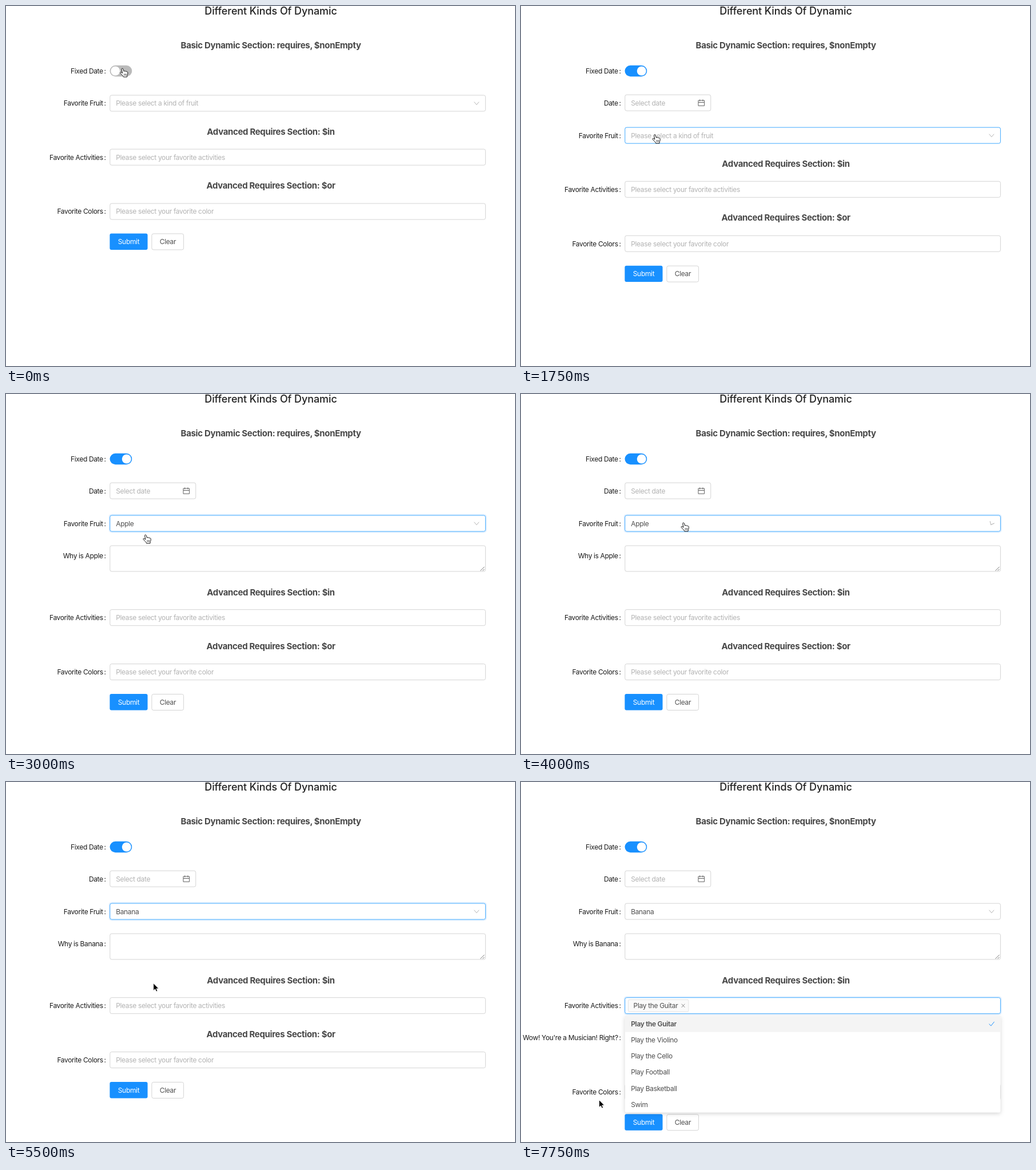
These frames come from a looping animation (890 by 629 pixels, 8 s). An HTML page:

```html
<!DOCTYPE html>
<html lang="en">
<head>
<meta charset="utf-8">
<title>Different Kinds Of Dynamic</title>
<style>
  html, body { margin: 0; width: 100%; height: 100%; overflow: hidden; background: #fff; }
  svg { display: block; width: 100%; height: 100%; }
  text { font: 12px Inter, "Open Sans", sans-serif; letter-spacing: -.34px; fill: #4f4f4f; }
  .title { font-size: 18px; font-weight: 500; letter-spacing: -.09px; fill: #222; text-anchor: middle; }
  .heading { font-size: 15px; font-weight: 700; letter-spacing: -.34px; fill: #484848; text-anchor: middle; }
  .label { fill: #1c1c1c; letter-spacing: -.36px; }
  .end, .mid { text-anchor: end; }
  .mid { text-anchor: middle; }
  .hint { fill: #b3b3b3; }
  .bold { font-weight: 600; }
  .white { fill: #fff; }
  .line { fill: none; stroke-width: 1; }
  .menu { filter: drop-shadow(0 2px 3.5px rgba(0, 0, 0, .17)); }
</style>
</head>
<body>
<svg id="stage" viewBox="0 0 890 629"></svg>
<script>
const LOOP = 8000, TICK = 250;
const BLUE = '#1890ff', FOCUS = '#40a9ff', BORDER = '#d4d4d4';
const LEFT = 181.8, WIDTH = 656.6, ROW = 28.16, STEP = 56.2;
const FRUITS = ['Apple', 'Banana', 'Orange', 'Kiwi', 'Other'];
const ACTIVITIES = ['Play the Guitar', 'Play the Violino', 'Play the Cello',
  'Play Football', 'Play Basketball', 'Swim'];

// time, x, y of the hot spot, shape
const POINTER = [
  [0, 203.2, 109.3, 'hand'], [1250, 203.2, 109.3, 'hand'],
  [1750, 233.6, 225.2, 'hand'], [2000, 233.6, 225.2, 'hand'],
  [2500, 230.2, 253.3, 'hand'], [2750, 230.2, 253.3, 'hand'],
  [3750, 283.7, 225.2, 'hand'], [4250, 283.7, 225.2, 'hand'],
  [4750, 268.2, 286.8, 'hand'], [5000, 268.2, 286.8, 'arrow'],
  [5750, 252.5, 384, 'beam'], [6250, 252.5, 384, 'beam'],
  [6500, 246, 416, 'hand'], [7250, 246, 416, 'arrow'],
  [7750, 136.5, 555.5, 'arrow'], [LOOP, 136.5, 555.5, 'arrow']
];

const SHAPES = {
  hand: `<path d="M-1 1.3C-1.3-.5 1.1-.8 1.6.8L3 5C3.6 4 5.3 4 5.6 5.1C6.4 4.4 7.7 4.7 7.9 5.8
    C8.9 5.3 9.7 6 9.7 7.2C9.7 9.5 9.3 10.5 8.7 12L8.4 14.7H2.2C1.6 12.5-1 10.5-3.2 8.2
    C-4.4 6.8-2.8 5.6-1.5 6.6L.3 8Z" fill="#fff" stroke="#111" stroke-linejoin="round"/>
    <path d="M3.4 9v3.4M5.3 9v3.4M7.1 9v3.4" stroke="#333" stroke-width=".8"/>`,
  arrow: `<path d="M0 0V13L3 10.2L5 14.6L7.2 13.6L5.3 9.4H9.3Z" fill="#000" stroke="#fff" stroke-width=".9"/>`,
  beam: `<path class="line" d="M-2.5-6.5Q0-6.5 0-4.5V4.5Q0 6.5-2.5 6.5M2.5-6.5Q0-6.5 0-4.5M0 4.5Q0 6.5 2.5 6.5M-1.5 1.5H1.5" stroke="#222"/>`
};

const text = (x, y, content, type = '') =>
  `<text class="${type}" x="${x}" y="${y + 4.3}">${content}</text>`;
const heading = (y, content) => `<text class="heading" x="463.1" y="${y + 5.2}">${content}</text>`;
const label = (y, content) => text(169.7, y, content, 'label end') + text(171.4, y, ':', 'label');
const rect = (x, y, w, h, fill, stroke = 'none', radius = 3) =>
  `<rect x="${x}" y="${y}" width="${w}" height="${h}" rx="${radius}" fill="${fill}" stroke="${stroke}"/>`;
const line = (d, stroke, extra = '') => `<path class="line" d="${d}" stroke="${stroke}" ${extra}/>`;

function box(y, { w = WIDTH, h = 28, focus = false, hover = false } = {}) {
  const ring = focus ? rect(LEFT - 1.5, y - 15.6, w + 3, h + 3, 'none', '#cfe7ff', 4) : '';
  return ring + rect(LEFT, y - 14.1, w, h, '#fff', focus || hover ? FOCUS : BORDER);
}

function chevron(y, angle) {
  return line('M-4.2-2.5L0 2.6L4.2-2.5', '#b4b4b4', `transform="translate(822.8 ${y}) rotate(${angle})"`);
}

function menu(y, items, active, selected, activeFill) {
  const top = y + 17.8;
  const rows = items.map((item, i) => {
    const fill = i === active ? activeFill : i === selected ? '#f4f4f4' : 'none';
    return rect(LEFT, top + i * ROW, WIDTH, ROW, fill, 'none', 0) +
      text(192.2, top + (i + .5) * ROW, item, i === selected ? 'bold' : '');
  });
  return `<g class="menu">${rect(LEFT, top, WIDTH, ROW * items.length, '#fff')}</g>` + rows.join('');
}

function toggle(on) {
  return rect(181.5, 103.8, 38.8, 19.4, on ? BLUE : '#bababa', 'none', 9.7) +
    `<circle cx="${on ? 210.8 : 191.2}" cy="113.5" r="8" fill="#fff"/>`;
}

function dateField(y) {
  return label(y, 'Date') + box(y - .8, { w: 150 }) + text(192.2, y, 'Select date', 'hint') +
    line(`M310 ${y - 5}h10.6v9.3h-10.6zM310 ${y - 1.5}h10.6M312.7 ${y - 6.6}v3M317.9 ${y - 6.6}v3`, '#606060');
}

function buttons(y) {
  return rect(181.4, y - 14.4, 66.2, 28.4, BLUE) + text(214.5, y, 'Submit', 'mid white') +
    rect(254.9, y - 14, 55.7, 28, '#fff', BORDER) + text(283, y, 'Clear', 'mid');
}

function pointer(t) {
  const i = POINTER.findLastIndex(key => key[0] <= t);
  const [t0, x0, y0, shape] = POINTER[i], [t1, x1, y1] = POINTER[i + 1];
  const k = (t - t0) / (t1 - t0);
  return `<g transform="translate(${x0 + (x1 - x0) * k} ${y0 + (y1 - y0) * k})">${SHAPES[shape]}</g>`;
}

function scene(t) {
  const during = (from, to) => t >= from && t < to;
  const dated = t >= 750;
  const fruit = t >= 5000 ? 'Banana' : t >= 3000 ? 'Apple' : '';
  const fruitOpen = during(2250, 3000) || during(4250, 5000);
  const activitiesOpen = t >= 6000;
  const musician = t >= 6750;

  const fruitY = 170 + (dated ? STEP : 0);
  const shift = fruitY - 170 + (fruit ? 70.4 : 0);
  const activityY = 264.2 + shift;
  const lower = shift + (musician ? STEP : 0);

  let out = `<text class="title" x="463" y="14.7">Different Kinds Of Dynamic</text>` +
    heading(68.5, 'Basic Dynamic Section: requires, $nonEmpty') +
    label(113.7, 'Fixed Date') + toggle(dated);
  if (dated) out += dateField(170);

  out += label(fruitY, 'Favorite Fruit') +
    box(fruitY, { focus: during(2000, 5750), hover: during(1750, 2000) }) +
    text(192.2, fruitY, fruit || 'Please select a kind of fruit', fruit ? '' : 'hint') +
    chevron(fruitY, fruitOpen ? 180 : during(4000, 4250) ? 25 : 0);

  if (fruit) {
    const y = fruitY + STEP;
    out += label(y, 'Why is ' + fruit) + box(y - 3.3, { h: 45 }) +
      line(`M829.5 ${y + 26.5}l7-7M833.5 ${y + 26.5}l3-3`, '#777');
  }

  out += heading(219.7 + shift, 'Advanced Requires Section: $in') +
    label(activityY, 'Favorite Activities') + box(activityY, { focus: t >= 5750 });
  if (musician) {
    out += rect(187.5, activityY - 10.5, 105.5, 21, '#fafafa', '#e4e4e4', 2) +
      text(196.6, activityY, ACTIVITIES[0]) +
      line(`M280.8 ${activityY - 3}l5.6 6m0-6l-5.6 6`, '#858585') +
      label(activityY + STEP, "Wow! You're a Musician! Right?");
  } else {
    out += text(192.2, activityY, 'Please select your favorite activities', 'hint');
  }
  if (during(6000, 6500) || during(7000, 7500))
    out += line(`M${musician ? 297.5 : 188.5} ${activityY - 7}v14.5`, '#333');

  out += heading(313.8 + lower, 'Advanced Requires Section: $or') +
    label(359.1 + lower, 'Favorite Colors') + box(359.1 + lower) +
    text(192.2, 359.1 + lower, 'Please select your favorite color', 'hint') +
    buttons(411.9 + lower);

  if (fruitOpen)
    out += menu(fruitY, FRUITS, t >= 4750 ? 1 : 0, FRUITS.indexOf(fruit), '#e0f1fb');
  if (activitiesOpen) {
    out += menu(activityY, ACTIVITIES, 0, musician ? 0 : -1, t < 7500 ? '#e0f1fb' : '#f4f4f4');
    if (musician) out += line(`M818.5 ${activityY + 31.8}l3.2 3.5l5.8-7.2`, BLUE);
  }
  return out + pointer(t);
}

const stage = document.getElementById('stage');
let shown = -1;
function draw(now) {
  const t = Math.floor(now % LOOP / TICK) * TICK;
  if (t !== shown) stage.innerHTML = scene(shown = t);
  requestAnimationFrame(() => draw(performance.now()));
}
draw(0);
</script>
</body>
</html>
```
